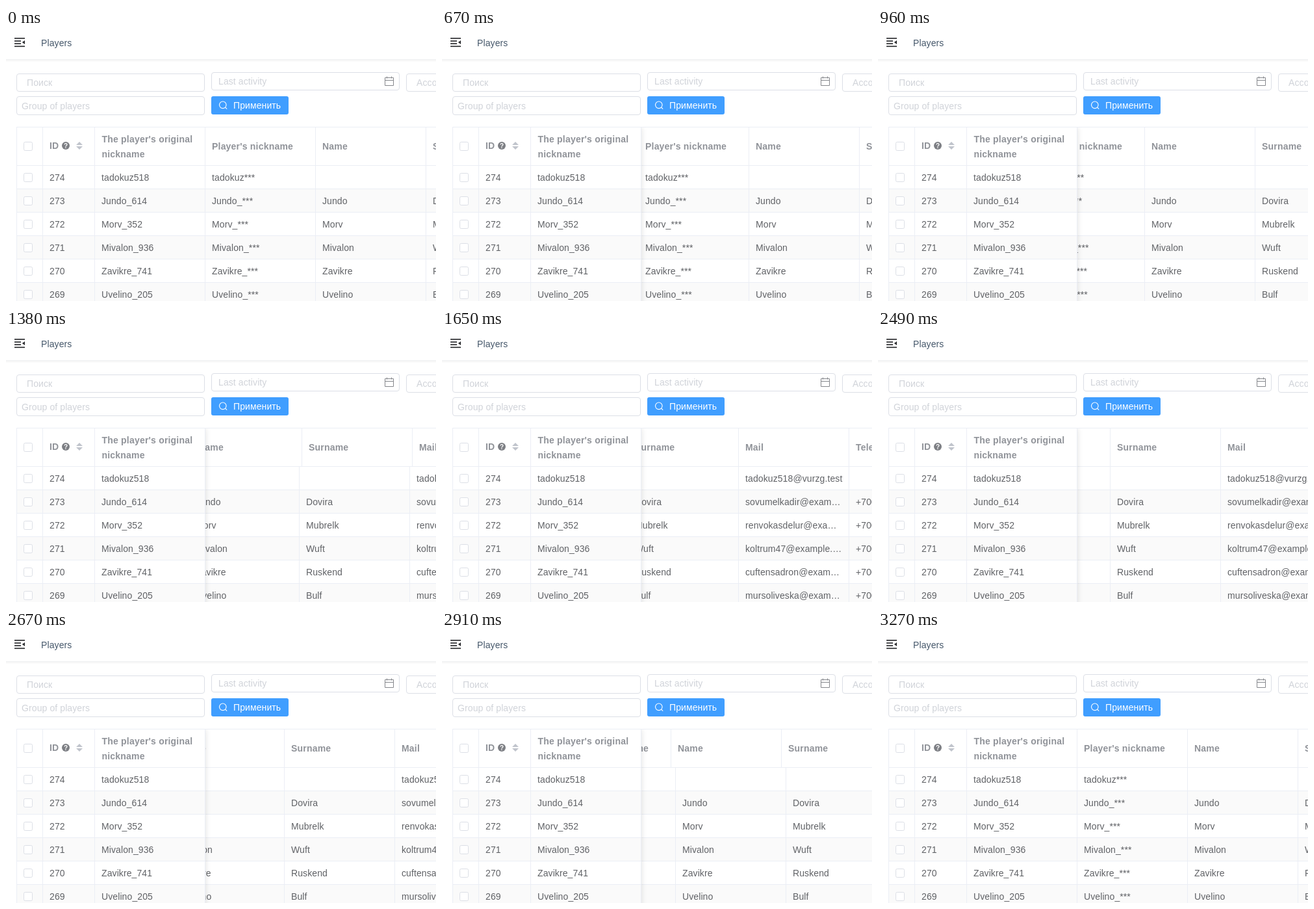
Write an HTML page that moves like this. It is 662 px wide and 420 px high and loops after 4.71 s.

```html
<!DOCTYPE html>
<html lang="en">
<head>
<meta charset="utf-8">
<title>Players</title>
<style>
  html, body { margin: 0; width: 100%; height: 100%; overflow: hidden; background: #fff; }
  svg { display: block; }
  text { font: 14px "Liberation Sans", Arial, sans-serif; letter-spacing: .1px; fill: #606266; white-space: pre; }
  .th { font-weight: bold; letter-spacing: .2px; fill: #909399; }
  .hint { fill: #d0d3d9; }
  .title { fill: #46586b; }
  .on { fill: #fff; }
  .box { fill: #fff; stroke: #dcdfe6; }
  .line { fill: #ebeef5; }
  .stripe { fill: #fafafa; }
</style>
</head>
<body>
<svg id="stage" width="662" height="420" viewBox="0 0 662 420">
  <defs>
    <clipPath id="view"><rect x="307" y="153" width="355" height="267"/></clipPath>
    <filter id="soft2" x="-5%" y="-50%" width="110%" height="200%"><feGaussianBlur stdDeviation="2"/></filter>
    <filter id="soft5" x="-20%" y="-20%" width="140%" height="140%"><feGaussianBlur stdDeviation="5"/></filter>
  </defs>

  <rect x="-20" y="1" width="702" height="48" fill="#001529" opacity=".1" filter="url(#soft2)"/>
  <rect width="662" height="48" fill="#fff"/>
  <g fill="#2f3033">
    <rect x="13" y="15" width="16" height="1.7"/>
    <rect x="13" y="19.2" width="10" height="1.7"/>
    <rect x="13" y="23.3" width="10" height="1.7"/>
    <rect x="13" y="27.4" width="16" height="1.7"/>
    <path d="M29 19v6l-4.2-3z"/>
  </g>
  <text class="title" x="54" y="28">Players</text>

  <rect class="box" x="16.5" y="70.5" width="289" height="27" rx="3.5"/>
  <text class="hint" x="32" y="89">Поиск</text>
  <rect class="box" x="316.5" y="68.5" width="289" height="27" rx="3.5"/>
  <text class="hint" x="327" y="87">Last activity</text>
  <path d="M583.5 76.5h13v12h-13zM583.5 80.5h13M586.5 74.5v3M593.5 74.5v3" fill="none" stroke="#85878c"/>
  <rect class="box" x="616.5" y="70.5" width="289" height="27" rx="3.5"/>
  <text class="hint" x="632" y="89">Account</text>
  <rect class="box" x="16.5" y="105.5" width="289" height="28" rx="3.5"/>
  <text class="hint" x="24" y="125">Group of players</text>
  <rect x="316" y="105" width="119" height="28" rx="3" fill="#409eff"/>
  <g fill="none" stroke="#fff" stroke-width="1.1">
    <circle cx="333.8" cy="118.3" r="5.3"/>
    <path d="M337.6 122.1l2.6 2.6"/>
  </g>
  <text class="on" x="350" y="124">Применить</text>

  <g id="grid"></g>
  <g clip-path="url(#view)">
    <g id="head"></g>
    <g id="body"></g>
    <rect id="shade" x="16" y="153" width="291" height="320" opacity=".12" filter="url(#soft5)"/>
  </g>
  <g id="fixed"></g>
</svg>

<script>
const LOOP = 4710, COL = 170, LEFT = 307, ROW = 36, TOP = 212;

const titles = ["Player's nickname", "Name", "Surname", "Mail", "Telephone"];
// id, nickname, name, surname, mail, telephone
const players = [
  [274, "tadokuz518", "", "", "tadokuz518@vurzg.test", ""],
  [273, "Jundo_614", "Jundo", "Dovira", "sovumelkadir@exam…", "+70005518364"],
  [272, "Morv_352", "Morv", "Mubrelk", "renvokasdelur@exa…", "+70003170452"],
  [271, "Mivalon_936", "Mivalon", "Wuft", "koltrum47@example.…", "+70008246019"],
  [270, "Zavikre_741", "Zavikre", "Ruskend", "cuftensadron@exam…", "+70006120473"],
  [269, "Uvelino_205", "Uvelino", "Bulf", "mursoliveska@exam…", "+70007740718"]
];

const $ = id => document.getElementById(id);
const grid = $("grid"), head = $("head"), body = $("body"), fixed = $("fixed"), shade = $("shade");

function add(parent, tag, attrs, content) {
  const el = document.createElementNS("http://www.w3.org/2000/svg", tag);
  for (const key in attrs) el.setAttribute(key, attrs[key]);
  if (content !== undefined) el.textContent = content;
  parent.append(el);
  return el;
}
const rect = (parent, cls, x, y, width, height) => add(parent, "rect", { class: cls, x, y, width, height });
const label = (parent, x, y, content, cls = "td") => add(parent, "text", { class: cls, x, y }, content);
const check = y => add(fixed, "rect", { class: "box", x: 27.5, y: y - 6.5, width: 13, height: 13, rx: 2 });

function buildTable() {
  players.forEach((p, i) => {
    const y = TOP + i * ROW, base = y + 23;
    if (i % 2) rect(grid, "stripe", 17, y, 645, ROW - 1);
    rect(grid, "line", 16, y + ROW - 1, 646, 1);
    check(y + 18);
    label(fixed, 67, base, p[0]);
    label(fixed, 147, base, p[1]);
    [p[1].replace(/\d+$/, "***"), ...p.slice(2)].forEach((value, c) =>
      label(body, LEFT + c * COL + 10, base, value));
  });
  rect(grid, "line", 16, 152, 646, 1);
  rect(grid, "line", 16, 211, 646, 1);
  for (const x of [16, 56, 136, 306]) rect(fixed, "line", x, 152, 1, 268);

  titles.forEach((title, c) => {
    const x = LEFT + c * COL;
    label(head, x + 10, 187, title, "th");
    rect(head, "line", x + COL - 1, 153, 1, 58);
    rect(body, "line", x + COL - 1, TOP, 1, 208);
  });

  check(182);
  label(fixed, 67, 186, "ID", "th");
  add(fixed, "circle", { cx: 92, cy: 181, r: 6, fill: "#7d7f84" });
  add(fixed, "text", { x: 92, y: 184.7, "text-anchor": "middle",
    style: "font-size:10px;font-weight:bold;fill:#fff;letter-spacing:0" }, "?");
  add(fixed, "path", { d: "M108 180h10l-5-5zM108 182h10l-5 5z", fill: "#c0c4cc" });
  label(fixed, 147.5, 176, "The player's original", "th");
  label(fixed, 147.5, 199, "nickname", "th");
}

// Screen refresh times: spans given as [start, end, steps]
function ticksOf(spans) {
  const out = [];
  for (const [a, b, n] of spans)
    for (let k = 0; k < n; k++) out.push(Math.floor((a + k * (b - a) / n) / 10) * 10);
  out.push(spans.at(-1)[1]);
  return out;
}

// Each drag: refresh times and knots [time, scroll, speed]
const drags = [
  {
    ticks: ticksOf([[670, 1000, 10], [1000, 1210, 7], [1210, 1380, 5], [1380, 1770, 13]]),
    knots: [[670, 4, .15], [960, 66, .28], [1380, 195, .29], [1770, 406, .1]]
  },
  {
    ticks: ticksOf([[2150, 2490, 11], [2490, 2700, 7], [2700, 2910, 6], [2910, 3270, 12]]),
    knots: [[2150, 404, -.1], [2490, 289, -.42], [2910, 117, -.48], [3270, 0, -.1]]
  }
];

// Cubic Hermite curve through the knots
function curve(knots, t) {
  let i = 0;
  while (i < knots.length - 2 && t > knots[i + 1][0]) i++;
  const [t0, p0, v0] = knots[i], [t1, p1, v1] = knots[i + 1];
  const h = t1 - t0, u = (t - t0) / h, w = 1 - u;
  return w * w * ((1 + 2 * u) * p0 + u * h * v0) + u * u * ((3 - 2 * u) * p1 - w * h * v1);
}

// The header follows the body a moment late on every other refresh
function scrollAt(t) {
  const drag = t < 670 ? null : t < 2150 ? drags[0] : drags[1];
  if (!drag) return [0, 0];
  const { ticks, knots } = drag, last = ticks.length - 1;
  let k = last;
  while (ticks[k] > t) k--;
  const late = k > 0 && k < last && k % 2 === 0 ? 14 : 0;
  return [curve(knots, ticks[k]), curve(knots, ticks[k] - late)].map(Math.round);
}

function draw() {
  const [bodyX, headX] = scrollAt(performance.now() % LOOP);
  body.setAttribute("transform", `translate(${-bodyX} 0)`);
  head.setAttribute("transform", `translate(${-headX} 0)`);
  shade.setAttribute("visibility", bodyX > 0 ? "visible" : "hidden");
  requestAnimationFrame(draw);
}

buildTable();
draw();
</script>
</body>
</html>
```
